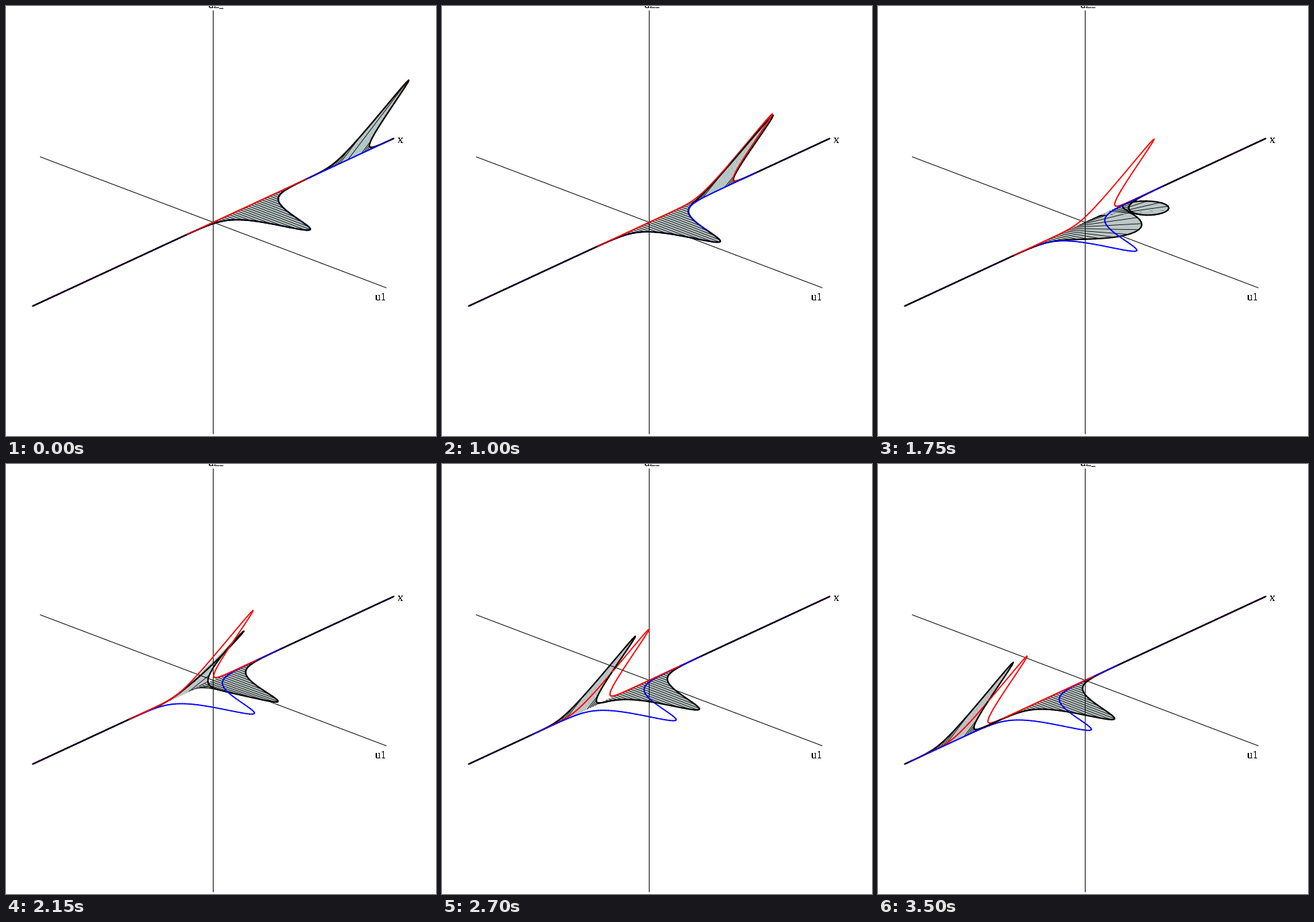
A matplotlib script that plays this animation: 634 px wide and 634 px high, repeating every 3.55 s.

```python
import numpy as np
import matplotlib.pyplot as plt
from matplotlib.animation import FuncAnimation
from matplotlib.collections import PolyCollection

SIZE, DPI = 634, 100
FRAMES, INTERVAL = 71, 50
PX = 72 / DPI  # points per pixel

plt.rcParams["text.antialiased"] = False
plt.rcParams["font.family"] = "Liberation Serif"

# Screen vectors of the unit axes x, u1, u2, and their share of depth
AXES = np.array([[266, -123.5], [255, 96.5], [0, -312]])
DEPTH = np.array([0.78, -0.81, -0.56])
ORIGIN = np.array([305.5, 318.9])

# Two vector solitons: wave number, start, speed, polarisation
K1, START1, V1 = 21.8, 0.1906, 0.0072
K2, START2, V2 = 36.0, 0.75, 0.02007
ANGLE = np.radians(54.2)
P = np.array([1.0, 0.0])
Q = np.array([np.cos(ANGLE), np.sin(ANGLE)])
SCALE = 0.0165
R2 = ((K1 - K2) / (K1 + K2)) ** 2
CROSS = 8 * K1 * K2 * (P @ Q) / (K1 + K2) ** 2

BLACK, RED, BLUE = (0, 0, 0, 1), (1, 0, 0, 1), (0, 0, 1, 1)
CLEAR = (0, 0, 0, 0)
CURVE_X = np.linspace(-1, 1, 321)
STRIP_X = np.linspace(-1, 1, 135)
ABOVE = 3  # depth bias that lifts the curves over the surface


def project(points):
    return ORIGIN + points @ AXES


def space(x, u):
    return np.column_stack([x, u])


def free(x, k, centre, direction):
    return SCALE * k * np.outer(1 / np.cosh(k * (x - centre)), direction)


def colliding(x, c1, c2):
    """Two-soliton solution of the vector mKdV equation."""
    e1 = np.exp(-K1 * (x - c1)) / R2
    e2 = np.exp(-K2 * (x - c2))
    f = 1 + e1**2 + e2**2 + CROSS * e1 * e2 + (R2 * e1 * e2) ** 2
    g1 = 2 * K1 * e1 * (1 + R2 * e2**2) / f
    g2 = 2 * K2 * e2 * (1 + R2 * e1**2) / f
    return SCALE * (np.outer(g1, P) + np.outer(g2, Q))


class Scene:
    """Collects lines and faces, then sorts them back to front."""

    def __init__(self):
        self.items = []

    def add(self, points, face, edge, width, bias):
        depth = (points @ DEPTH).mean() + bias
        self.items.append((depth, project(points), face, edge, width * PX))

    def line(self, points, color, width, bias):
        for i in range(len(points) - 1):
            self.add(points[i:i + 2], CLEAR, color, width, bias)

    def surface(self, x, u):
        size = np.hypot(u[:, 0], u[:, 1])
        base = space(x, 0 * u)
        tip = space(x, u)
        for i in range(len(x) - 1):
            if max(size[i], size[i + 1]) < 0.004:
                continue
            mix = (x[i] + 1) / 2
            face = (0.77 - 0.07 * mix, 0.77 + 0.03 * mix, 0.77 + 0.02 * mix, 1)
            quad = np.array([base[i], tip[i], tip[i + 1], base[i + 1]])
            self.add(quad, face, CLEAR, 0, 0)
            # The bias puts each rib over both faces that share it
            self.add(quad[:2], CLEAR, BLACK, 0.85, 0.02)

    def show(self, collection):
        self.items.sort(key=lambda item: item[0])
        _, verts, faces, edges, widths = zip(*self.items)
        collection.set_verts(verts, closed=False)
        collection.set_facecolor(faces)
        collection.set_edgecolor(edges)
        collection.set_linewidth(widths)
        # Smooth lines, but faces without seams
        collection.set_antialiased([width > 0 for width in widths])


def add_axes(scene):
    steps = np.linspace(-1, 1, 17)
    zero = 0 * steps
    scene.line(np.column_stack([zero, steps, zero]), BLACK, 1, -0.2)
    scene.line(np.column_stack([zero, zero, steps]), BLACK, 1, 0)


fig = plt.figure(figsize=(SIZE / DPI, SIZE / DPI), dpi=DPI, facecolor="white")
ax = fig.add_axes([0, 0, 1, 1])
ax.set_xlim(0, SIZE)
ax.set_ylim(SIZE, 0)
ax.axis("off")

shapes = PolyCollection([], capstyle="round")
shapes.set_snap(False)
ax.add_collection(shapes, autolim=False)

for label, left, baseline in (("u1", 544, 434), ("x", 577, 202), ("u2", 298, 3)):
    ax.text(left, baseline, label, fontsize=17.5 * PX, va="baseline")
tick, = ax.plot([315, 320], [2.5, 2.5], color="black", lw=PX, snap=False)


def update(frame):
    c1 = START1 - V1 * frame
    c2 = START2 - V2 * frame
    x = CURVE_X
    scene = Scene()
    add_axes(scene)
    scene.surface(STRIP_X, colliding(STRIP_X, c1, c2))
    # Tiny extra biases settle ties where curves share the x axis
    scene.line(space(x, free(x, K2, c2, Q)), RED, 1.8, ABOVE)
    scene.line(space(x, free(x, K1, c1, P)), BLUE, 1.8, ABOVE + 2e-4)
    scene.line(space(x, colliding(x, c1, c2)), BLACK, 2.1, ABOVE + 4e-4)
    scene.show(shapes)
    low = frame < 4 or frame > 67
    tick.set_ydata([3.5, 3.5] if low else [2.5, 2.5])
    return shapes, tick


anim = FuncAnimation(fig, update, frames=FRAMES, interval=INTERVAL,
                     repeat=True, repeat_delay=0)
plt.show()
```
